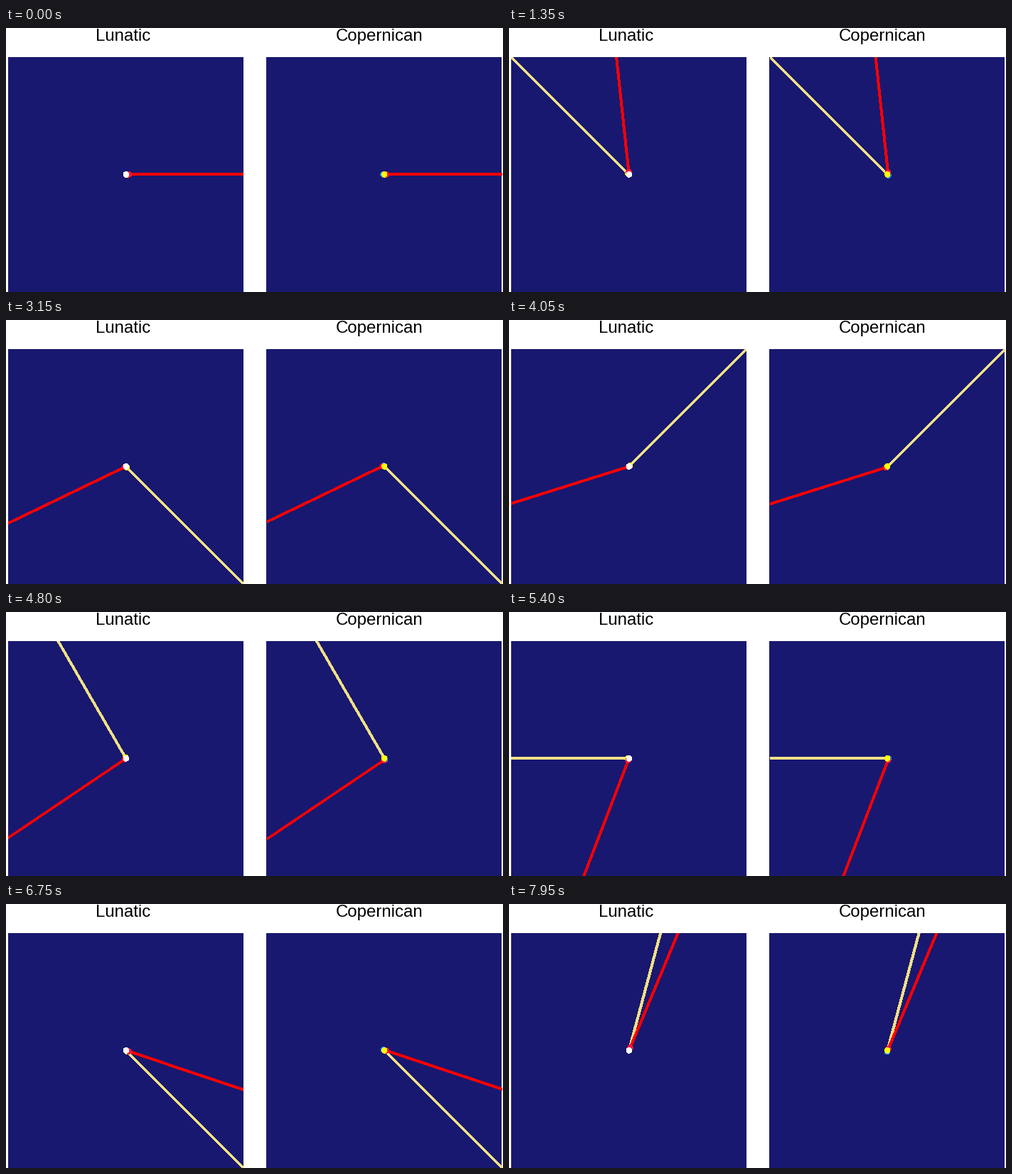
These frames come from a looping animation (699x372 px, 8 s). A matplotlib script:

```python
import math

import matplotlib.pyplot as plt
from matplotlib.animation import FuncAnimation
from matplotlib.patches import Circle, Polygon, Rectangle

WIDTH, HEIGHT, DPI = 699, 372, 100
PX = 72 / DPI
AU = 1.65                    # pixels per astronomical unit
MARS_RADIUS, MARS_YEAR = 1.52, 687 / 365
STEP_ANGLE = math.radians(15)
HOLD = 3                     # ticks per simulation step
TICK = 50                    # ms
TICKS = 160
SKY, SUNRAY = "#181870", "#f0e086"
MARS, EARTH = "#f5143c", "#1e90ff"

plt.rcParams["font.family"] = "Liberation Sans"
fig = plt.figure(figsize=(WIDTH / DPI, HEIGHT / DPI), dpi=DPI, facecolor="white")
ax = fig.add_axes([0, 0, 1, 1])
ax.set(xlim=(0, WIDTH), ylim=(HEIGHT, 0))
ax.axis("off")


def polar(radius, angle):
    return radius * complex(math.cos(angle), math.sin(angle))


def ray_outline(start, end):
    """Band three pixels thick, measured across the minor axis."""
    (x0, y0), (x1, y1) = start, end
    dx, dy = (0, 1.5) if abs(x1 - x0) >= abs(y1 - y0) else (1.5, 0)
    return [(x0 - dx, y0 - dy), (x1 - dx, y1 - dy),
            (x1 + dx, y1 + dy), (x0 + dx, y0 + dy)]


class Panel:
    """A square sky seen from one fixed body, with rays from the Earth."""

    def __init__(self, title, title_x, left, clip_left, center_x, fixed, dots):
        self.center = center_x, 206.4
        self.fixed = fixed
        ax.add_patch(Rectangle((left, 41), 331, 331, color=SKY, lw=0))
        ax.text(title_x, 18, title, size=24 * PX, ha="left", va="baseline")
        clip = Rectangle((clip_left, 41), 331, 331, transform=ax.transData)
        self.rays = {}
        for body, color in (("sun", SUNRAY), ("mars", "red")):
            ray = Polygon([self.center] * 4, fc=color, lw=0, antialiased=False,
                          snap=False, zorder=3)
            self.rays[body] = ax.add_patch(ray)
            ray.set_clip_path(clip)
        self.dots = {}
        for body, color in dots:
            dot = Circle(self.center, 3.7, fc=color, lw=0, antialiased=False, zorder=4)
            self.dots[body] = ax.add_patch(dot)

    def to_pixels(self, point):
        return self.center[0] + AU * point.real, self.center[1] - AU * point.imag

    def update(self, bodies):
        origin = bodies[self.fixed]
        earth = bodies["earth"] - origin
        for body, ray in self.rays.items():
            toward = bodies[body] - bodies["earth"]
            far = earth + 300 * toward / abs(toward)
            ray.set_xy(ray_outline(self.to_pixels(earth), self.to_pixels(far)))
        for body, dot in self.dots.items():
            dot.center = self.to_pixels(bodies[body] - origin)


panels = [
    Panel("Lunatic", 126.1, 3, 3, 168.8, "moon",
          [("sun", "yellow"), ("mars", MARS), ("moon", "white")]),
    Panel("Copernican", 464.1, 366, 367, 532.3, "sun",
          [("earth", EARTH), ("mars", MARS), ("sun", "yellow")]),
]


def update(tick):
    sun_angle = tick // HOLD * STEP_ANGLE
    earth = -polar(1, sun_angle)
    bodies = {
        "sun": 0j,
        "earth": earth,
        "moon": earth,       # the lunar orbit is far below one pixel
        "mars": polar(MARS_RADIUS, sun_angle / MARS_YEAR),
    }
    for panel in panels:
        panel.update(bodies)
    return []


anim = FuncAnimation(fig, update, frames=TICKS, interval=TICK,
                     repeat=True, repeat_delay=0, blit=False)
plt.show()
```
